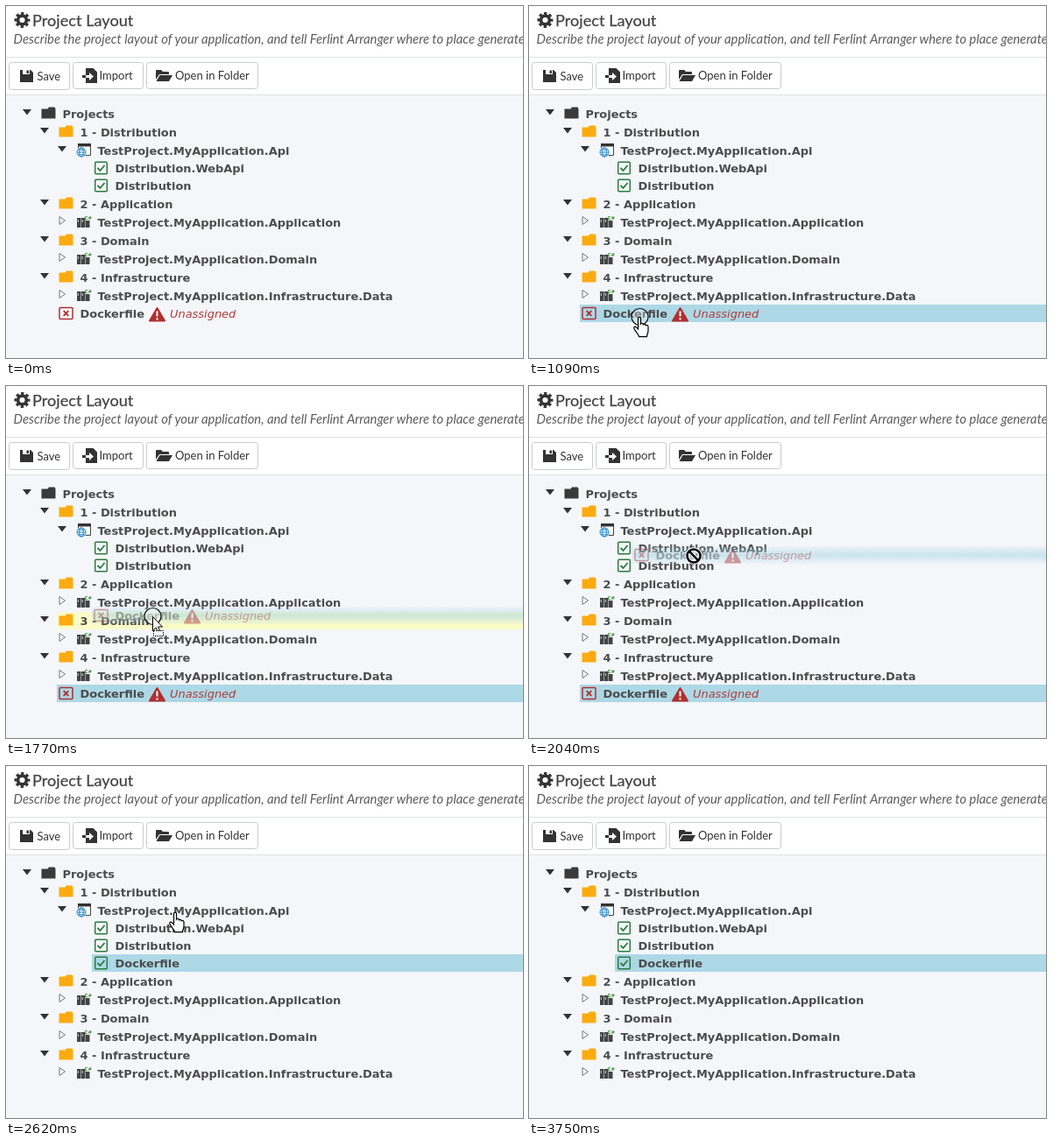
Animation, 590 px wide and 402 px high, one loop 4310 ms. Source, as an HTML page:

```html
<!DOCTYPE html>
<html lang="en">
<head>
<meta charset="utf-8">
<title>Project Layout</title>
<style>
  html, body { margin: 0; width: 100%; height: 100%; overflow: hidden; background: #fff; }
  svg { display: block; width: 590px; height: 402px; }
  .ui { font: 13px Lato, sans-serif; fill: #333; }
  .title { font-size: 18.2px; fill: #444; stroke: #444; stroke-width: .25px; }
  .sub { font-size: 14.8px; font-style: italic; fill: #5c5c5c; }
  .tree { font: bold 12.95px "DejaVu Sans", sans-serif; fill: #4c4c4c; }
  .note { font-weight: normal; font-style: oblique; fill: #b03a3a; }
  .button { fill: #fff; stroke: #c9cacd; }
</style>
</head>
<body>
<svg viewBox="0 0 590 402">
  <defs>
    <linearGradient id="fade" x2="0" y2="1">
      <stop offset="0" stop-color="#add8e6" stop-opacity=".1"/>
      <stop offset=".5" stop-color="#add8e6" stop-opacity=".6"/>
      <stop offset="1" stop-color="#add8e6" stop-opacity=".1"/>
    </linearGradient>
    <path id="down" d="M-5-3H5L0 3.500Z" fill="#333"/>
    <path id="right" d="M-3-4.500L3.500 0-3 4.500Z" fill="none" stroke="#777"/>
    <path id="folder" d="M.5-5.500H7.500L9-7.500H15.500L16.500-5.500V5.500H.5Z"/>
    <g id="web">
      <path d="M2.500-7.500H16.500V5.500H2.500Z" fill="#fff" stroke="#444"/>
      <path d="M2-8H17V-4.500H2Z" fill="#333"/>
      <circle cx="6" cy="2" r="6" fill="#fff"/>
      <g fill="none" stroke="#1e88c8">
        <circle cx="6" cy="2" r="5"/>
        <ellipse cx="6" cy="2" rx="2.300" ry="5"/>
        <path d="M1 2H11M2-.8H10M2 4.800H10"/>
      </g>
    </g>
    <g id="library">
      <path d="M1-5H5.500V6H1ZM6-5H10.500V6H6ZM11-2H15.500V6H11Z" fill="#444"/>
      <path d="M2.300-3V0M7.300-3V0" stroke="#ccc"/>
      <text x="9.500" y="-3" font-size="5.500" fill="#388a34">C#</text>
    </g>
    <g id="check" fill="none" stroke="#2d7a3e">
      <rect x="1.700" y="-6.800" width="13.600" height="13.600" rx="1" stroke-width="1.500"/>
      <path d="M4.500 0L7.500 3L12.500-3" stroke-width="1.800"/>
    </g>
    <g id="cross" fill="none" stroke="#b03030">
      <rect x="1" y="-6.500" width="15" height="13" rx="1" stroke-width="1.500"/>
      <path d="M5.700-2.800L11.300 2.800M11.300-2.800L5.700 2.800" stroke-width="1.900"/>
    </g>
    <g id="unassigned">
      <use href="#cross" x="60" y="351"/>
      <text x="84.500" y="356">Dockerfile</text>
      <path d="M172.500 345L181 359.500H164Z" fill="#b03030" stroke="#b03030" stroke-width="2" stroke-linejoin="round"/>
      <path d="M172.500 348.500V354.500M172.500 356.200V358.400" stroke="#fff" stroke-width="2"/>
      <text class="note" x="187" y="356">Unassigned</text>
    </g>
    <path id="arrow" d="M.5.5V16.500L4.200 13 6.700 18.700 9 17.700 6.500 12H11.500Z" fill="#fff" stroke="#000"/>
    <path id="hand" d="M-1.500 1.500C-1.500-.2 1.500-.2 1.500 1.500V8C2.200 7 4.200 7.200 4.300 8.700 5.200 7.900 7 8.300 7.100 9.700 8.300 9 10 9.700 10 11.300V16C10 18.500 8.500 19.500 8.500 22.700H-.5C-.5 20-4.500 17-6 13.500-7 11.300-5 10.300-3.600 11.800L-1.500 14Z" fill="#fff" stroke="#000" stroke-width="1.200"/>
    <g id="copy">
      <use href="#arrow"/>
      <rect x="1.500" y="16.500" width="11" height="6" fill="#fff" stroke="#000" stroke-dasharray="1.500 1"/>
    </g>
    <g id="denied" fill="none">
      <g id="sign"><circle r="7.500"/><path d="M-5.300-5.300L5.300 5.300"/></g>
    </g>
  </defs>

  <path d="M0 101H590V402H0Z" fill="#f4f6fa"/>
  <path d="M0 58.500H590M0 101.500H590" stroke="#dfe1e6"/>

  <g class="ui">
    <g transform="translate(18.500 16)" fill="none" stroke="#333">
      <circle r="4.900" stroke-width="3.600"/>
      <circle r="7.500" stroke-width="3" stroke-dasharray="3.300 2.590" stroke-dashoffset="1.650"/>
    </g>
    <text class="title" x="30" y="23">Project Layout</text>
    <text class="sub" x="8.500" y="43">Describe the project layout of your application, and tell Ferlint Arranger where to place generated</text>

    <rect class="button" x="3.500" y="64.500" width="69" height="31" rx="3"/>
    <rect class="button" x="76.500" y="64.500" width="80" height="30" rx="3"/>
    <rect class="button" x="160.500" y="64.500" width="127" height="30" rx="3"/>
    <path d="M16 73H28L31 76V87H16Z"/>
    <path d="M19 73H27V78H19Z" fill="#fff"/>
    <path d="M23.500 73.500H26V77H23.500Z"/>
    <text x="35.500" y="85">Save</text>
    <path d="M91 71H99.500L104 75.500V88H91ZM87 79H91V82H87Z"/>
    <path d="M91 79H95V76L100 80.500 95 85V82H91Z" fill="#fff"/>
    <text x="106.500" y="84">Import</text>
    <path d="M171 84V74Q171 73 172 73H177L179 75H185Q186 75 186 76V78H175Z"/>
    <path d="M175.500 79H190L186 86H171.500Z"/>
    <text x="193" y="84">Open in Folder</text>
  </g>

  <rect id="target" height="20" width="590" fill="#fbfbc8"/>
  <g class="tree">
    <g id="upper"></g>
    <g id="lower"></g>
    <g id="before">
      <rect id="selected" x="58" y="341" width="532" height="20" fill="#add8e6"/>
      <use href="#unassigned"/>
    </g>
    <g id="after">
      <rect x="98" y="215" width="492" height="20" fill="#add8e6"/>
      <use href="#check" x="100" y="225"/>
      <text x="124.500" y="230">Dockerfile</text>
    </g>
    <g id="ghost">
      <rect x="58" y="341" width="532" height="20" fill="url(#fade)"/>
      <use href="#unassigned" opacity=".45"/>
    </g>
  </g>
  <circle id="ring" r="9.500" fill="#fff" fill-opacity=".3" stroke="#111" stroke-width="1.200"/>
  <use id="cursor"/>
</svg>
<script>
const LOOP = 4310, DROP = 2620, SELECT = 1090;
const $ = id => document.getElementById(id);
const show = (id, on) => $(id).style.display = on ? "" : "none";
const move = (id, x, y) => $(id).setAttribute("transform", `translate(${x} ${y})`);

// white halo below the black "not allowed" sign
$("denied").innerHTML = ["#fff", "#000"].map((color, i) =>
  `<g stroke="${color}" stroke-width="${i ? 2.6 : 4.6}">${$("sign").innerHTML}</g>`).join("");

// level, centre line, icon, label, marker
const rows = [
  [0, 123, "folder", "Projects", "down"],
  [1, 144, "folder", "1 - Distribution", "down"],
  [2, 165, "web", "TestProject.MyApplication.Api", "down"],
  [3, 185, "check", "Distribution.WebApi"],
  [3, 205, "check", "Distribution"],
  [1, 226, "folder", "2 - Application", "down"],
  [2, 247, "library", "TestProject.MyApplication.Application", "right"],
  [1, 268, "folder", "3 - Domain", "down"],
  [2, 289, "library", "TestProject.MyApplication.Domain", "right"],
  [1, 310, "folder", "4 - Infrastructure", "down"],
  [2, 331, "library", "TestProject.MyApplication.Infrastructure.Data", "right"],
];
for (const [level, y, icon, label, marker] of rows) {
  const x = level * 20;
  $(y < 215 ? "upper" : "lower").innerHTML +=
    (marker ? `<use href="#${marker}" x="${x + 24}" y="${y - 2}"/>` : "") +
    `<use href="#${icon}" x="${x + 40}" y="${y}" fill="${level ? "#fbab10" : "#3a3a3a"}"/>` +
    `<text x="${x + 64.5}" y="${y + 5}">${label}</text>`;
}

// time, cursor, x, y, pressed, ghost offset, drop target row
const steps = [
  [0],
  [270, "arrow", 137, 389],
  [390, "arrow", 137, 376],
  [550, "arrow", 132, 362],
  [690, "hand", 129, 356],
  [810, "hand", 126, 355],
  [960, "hand", 126, 355, true],
  [1360, "denied", 126, 355, true],
  [1500, "denied", 135, 344, true, [9, -12]],
  [1650, "copy", 150, 304, true, [23, -50], 9],
  [1770, "copy", 167, 263, true, [40, -89], 7],
  [1890, "copy", 178, 230, true, [51, -125], 5],
  [2040, "denied", 188, 194, true, [60, -158]],
  [2160, "denied", 190, 179, true, [63, -175]],
  [2310, "copy", 193, 169, true, [67, -188], 2],
  [DROP, "hand", 193, 167],
  [3330, "hand", 275, 212],
  [3450, "hand", 390, 279],
  [3600, "arrow", 484, 387],
  [3750],
];

function draw(t) {
  const [, cursor, x, y, pressed, ghost, row] = steps.findLast(step => step[0] <= t);
  const dropped = t >= DROP;
  show("before", !dropped);
  show("after", dropped);
  show("selected", t >= SELECT);
  move("lower", 0, dropped ? 20 : 0);

  show("target", row);
  if (row) move("target", 38 + rows[row][0] * 20, rows[row][1] - 10);
  show("ghost", ghost);
  if (ghost) move("ghost", ...ghost);

  show("cursor", cursor);
  show("ring", pressed && cursor !== "denied");
  if (cursor) {
    $("cursor").setAttribute("href", "#" + cursor);
    move("cursor", x, y);
    move("ring", x + .5, y);
  }
}

const start = performance.now();
(function tick() {
  draw((performance.now() - start) % LOOP);
  requestAnimationFrame(tick);
})();
</script>
</body>
</html>
```
